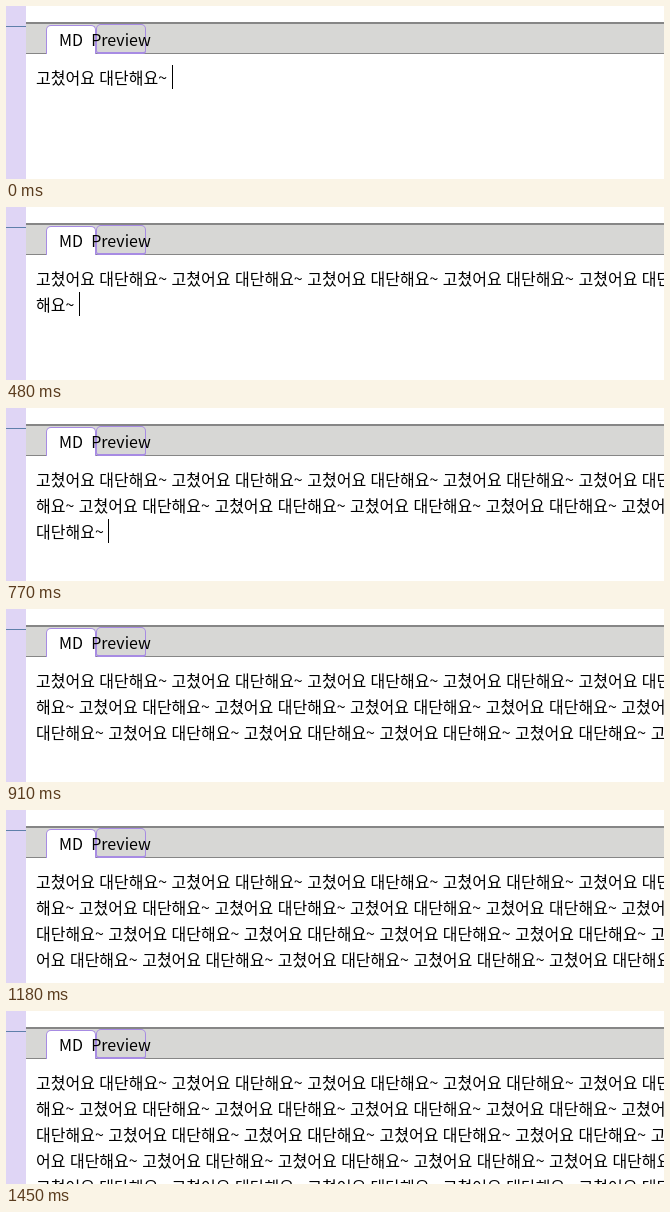
Write an HTML page that moves like this. It is 658 by 173 pixels and loops after 2180 ms.

```html
<!DOCTYPE html>
<html lang="ko">
<head>
<meta charset="utf-8">
<title>Editor</title>
<style>
  html, body { margin: 0; width: 100%; height: 100%; overflow: hidden; background: #fff; }
  body { position: relative; color: #000; font: 16px/26px "Noto Sans CJK KR", "Noto Sans CJK", "Noto Sans", sans-serif; }
  div { position: absolute; box-sizing: border-box; white-space: pre; }
  .side { left: 0; top: 0; width: 20px; height: 100%; background: #dfd5f5; }
  .rule { left: 0; top: 20px; width: 20px; height: 1px; background: #5f80aa; }
  .bar { left: 20px; top: 16px; right: 0; height: 32px; background: #d7d7d5; border: solid #868686; border-width: 2px 0 1px; }
  .tab { width: 50px; border: 1px solid #a78be3; border-radius: 5px 5px 0 0; }
  .on { left: 40px; top: 19px; height: 29px; background: #fff; border-bottom: 0; }
  .off { left: 90px; top: 18px; height: 30px; border-width: 1px 1px 2px; border-radius: 5px 5px 3px 3px; }
  .label { top: 20px; width: 80px; text-align: center; }
  .row { left: 30px; height: 26px; }
  .caret { position: absolute; width: 1px; height: 24px; margin-top: 1px; background: #000; }
</style>
</head>
<body>
<div class="side"></div>
<div class="rule"></div>
<div class="bar"></div>
<div class="tab on"></div>
<div class="tab off"></div>
<div class="label" style="left:25px">MD</div>
<div class="label" style="left:75px">Preview</div>
<script>
const LOOP = 2180;
const text = "고쳤어요 대단해요~ ".repeat(24);
const breaks = [0, 51, 104, 156, 209, 260];

// [time in ms, characters typed]
const steps = [
  [0, 11], [270, 33], [340, 44], [410, 51],
  [480, 55], [550, 77], [620, 104],
  [770, 110], [840, 132], [910, 156],
  [1040, 165], [1110, 187], [1180, 209],
  [1310, 220], [1380, 242], [1450, 260]
];

const rows = breaks.slice(1).map((_, i) => {
  const row = document.createElement("div");
  row.className = "row";
  row.style.top = 58 + 26 * i + "px";
  return document.body.appendChild(row);
});
const caret = document.createElement("span");
caret.className = "caret";

let shown = -1;
function type(count) {
  if (count === shown) return;
  shown = count;
  rows.forEach((row, i) => {
    const from = breaks[i], to = breaks[i + 1];
    row.textContent = text.slice(from, Math.max(from, Math.min(count, to)));
    if (count > from && count <= to) row.append(caret);
  });
}

function tick() {
  const t = performance.now() % LOOP;
  type(steps.findLast(([at]) => at <= t)[1]);
  requestAnimationFrame(tick);
}
tick();
</script>
</body>
</html>
```
